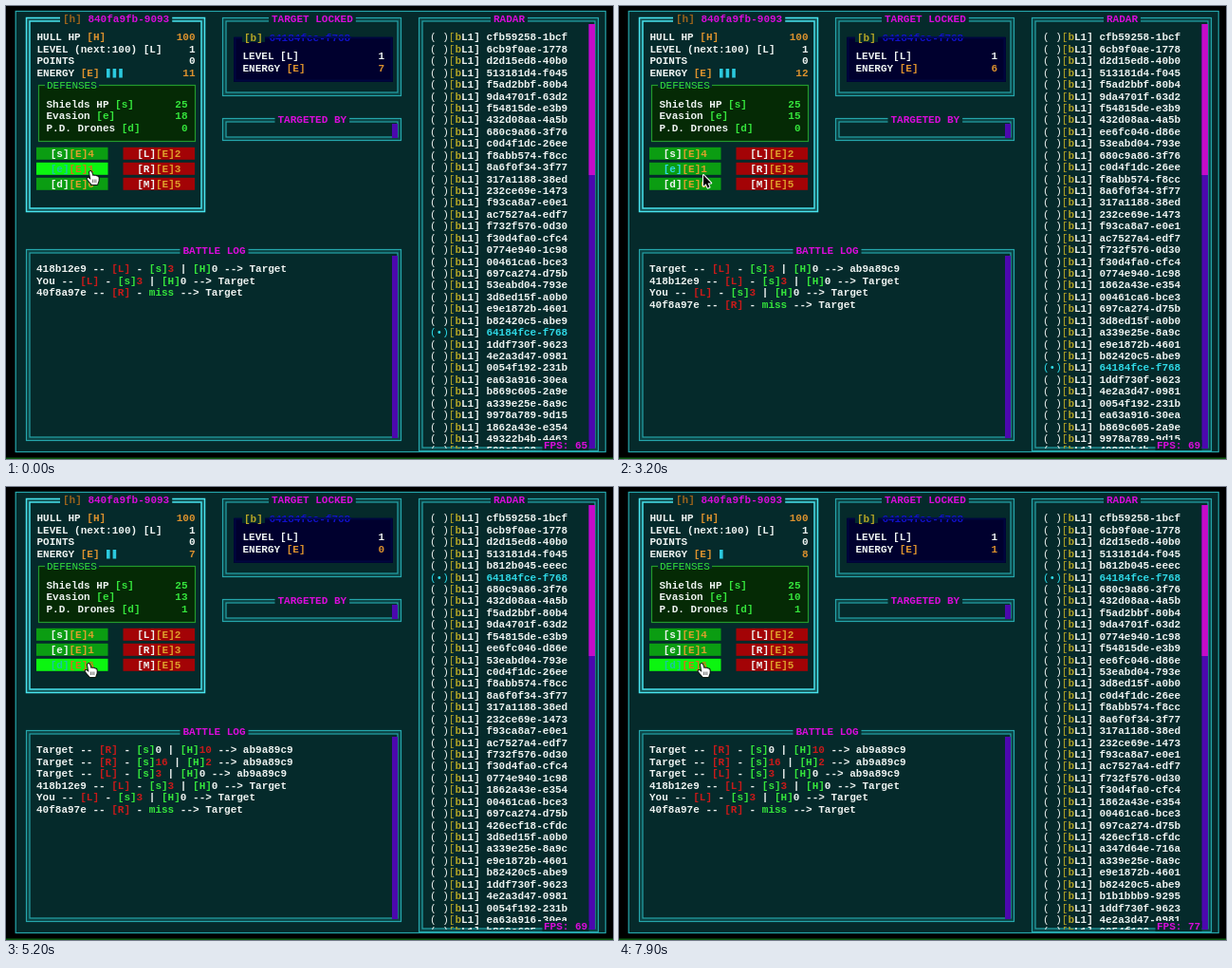
An HTML page with a canvas that plays this animation: 640 px wide and 477 px high, repeating every 8 s.

```html
<!DOCTYPE html>
<html lang="en">
<head>
<meta charset="utf-8">
<title>Battle console</title>
<style>
html, body { margin: 0; width: 100%; height: 100%; overflow: hidden; background: #000; }
canvas { display: block; width: 640px; height: 477px; }
</style>
</head>
<body>
<canvas id="stage" width="640" height="477"></canvas>
<script>
const ctx = document.getElementById('stage').getContext('2d');
const LOOP = 8000, CELL = 6.601, ROW = 12.43;
const FACE = '11px "Liberation Mono", "DejaVu Sans Mono", monospace';
const BG = '#052a2b', TEAL = '#25a6ab', CYAN = '#48e4ee', PURPLE = '#4c08ae';

// Colour codes used inside {x} tags; capitals are in regular weight.
const INK = {
  w: '#eef3f1', W: '#eef3f1', o: '#dd922e', g: '#35e53c', G: '#35e03c', r: '#c81a1a',
  c: '#2fd9e6', C: '#2fd9e6', y: '#b5a526', Y: '#b5a526', m: '#d80cda', h: '#9a631c',
  b: '#1010c8', f: '#dda02c', x: '#d3721a', t: '#18c8a0'
};

const ships = ('cfb59258-1bcf 6cb9f0ae-1778 d2d15ed8-40b0 513181d4-f045 f5ad2bbf-80b4 9da4701f-63d2 ' +
  'f54815de-e3b9 432d08aa-4a5b 680c9a86-3f76 c0d4f1dc-26ee f8abb574-f8cc 8a6f0f34-3f77 317a1188-38ed ' +
  '232ce69e-1473 f93ca8a7-e0e1 ac7527a4-edf7 f732f576-0d30 f30d4fa0-cfc4 0774e940-1c98 00461ca6-bce3 ' +
  '697ca274-d75b 53eabd04-793e 3d8ed15f-a0b0 e9e1872b-4601 b82420c5-abe9 64184fce-f768 1ddf730f-9623 ' +
  '4e2a3d47-0981 0054f192-231b ea63a916-30ea b869c605-2a9e a339e25e-8a9c 9978a789-9d15 1862a43e-e354 ' +
  '49322b4b-4463 509c2a92-2a9e').split(' ');
const locked = '64184fce-f768';

// Radar updates: time, ship, new row.
const moves = [
  [1600, 'ee6fc046-d86e', 8], [1700, '1862a43e-e354', 20], [1800, 'a339e25e-8a9c', 25],
  [2700, '53eabd04-793e', 9],
  [3800, locked, 4], [3800, '680c9a86-3f76', 5], [4100, '426ecf18-cfdc', 25],
  [4900, 'b812b045-eeec', 4], [5100, '432d08aa-4a5b', 7], [5300, '0774e940-1c98', 10], [5500, '3d8ed15f-a0b0', 14],
  [6500, 'a347d64e-716a', 28], [7100, 'b1b1bbb9-9295', 32]
];

// Battle log, newest last.
const log = [
  [0, '{w}40f8a97e -- {r}[R]{w} - {g}miss{w} --> Target'],
  [0, '{w}You -- {r}[L]{w} - {g}[s]{r}3{w} | {g}[H]{w}0 --> Target'],
  [0, '{w}418b12e9 -- {r}[L]{w} - {g}[s]{r}3{w} | {g}[H]{w}0 --> Target'],
  [1700, '{w}Target -- {r}[L]{w} - {g}[s]{r}3{w} | {g}[H]{w}0 --> ab9a89c9'],
  [3800, '{w}Target -- {r}[R]{w} - {g}[s]{r}16{w} | {g}[H]{r}2{w} --> ab9a89c9'],
  [4200, '{w}Target -- {r}[R]{w} - {g}[s]{w}0 | {g}[H]{r}10{w} --> ab9a89c9']
];

const DRONE = 4000;
const fps = [[0, 65], [900, 66], [1800, 68], [2900, 69], [4000, 67], [5100, 69], [6200, 72], [7200, 77]];
const targetEnergy = [[0, 7], [1700, 5], [2500, 6], [3800, 3], [4200, 0], [5700, 1]];
const pointer = [[0, 88, 174], [1600, 88, 174], [1900, 88, 181], [2400, 88, 181], [2700, 89, 178], [3400, 89, 178], [3700, 86, 186], [LOOP, 86, 186]];

const valueAt = (steps, t) => steps.filter(s => s[0] <= t).pop()[1];

function pointerAt(t) {
  const i = pointer.findIndex(p => p[0] > t);
  const a = pointer[i - 1], b = pointer[i];
  const u = (t - a[0]) / (b[0] - a[0]), k = u * u * (3 - 2 * u);
  return [a[1] + (b[1] - a[1]) * k, a[2] + (b[2] - a[2]) * k];
}

function box(x, y, w, h, color) {
  ctx.fillStyle = color;
  ctx.fillRect(x, y, w, h);
}

function outline(x, y, w, h, color, width = 1) {
  ctx.strokeStyle = color;
  ctx.lineWidth = width;
  ctx.strokeRect(x + .5, y + .5, w, h);
}

// Tagged text; y is the middle of the line.
function text(x, y, tagged) {
  let code = 'w';
  tagged.split(/\{(\w)\}/).forEach((part, i) => {
    if (i % 2) { code = part; return; }
    ctx.font = (/[a-z]/.test(code) ? 'bold ' : '') + FACE;
    ctx.fillStyle = INK[code];
    ctx.fillText(part, x, y + 3.4);
    x += part.length * CELL;
  });
}

function right(x, y, code, value) {
  text(x - String(value).length * CELL, y, `{${code}}${value}`);
}

function panel(x, y, w, h, color, title, tx, width) {
  ctx.globalAlpha = .2;
  outline(x + 1.7, y + 1.7, w - 3.4, h - 3.4, color, 3);
  ctx.globalAlpha = 1;
  outline(x, y, w, h, color, width);
  outline(x + 3.5, y + 3.5, w - 7, h - 7, color, width);
  const len = title.replace(/\{\w\}/g, '').length;
  box(tx - 3, y - 1, len * CELL + 6, 8, BG);
  text(tx, y + 1.5, title);
}

function button(x, y, color, label, cost, ink = 'w', costInk = 'f') {
  box(x, y - 6.5, 75.5, 13, color);
  text(x + 14.7, y, `{${ink}}[${label}]{${costInk}}[E]${cost}`);
}

function shipPanel(t, tipY) {
  panel(21, 12, 188, 204, CYAN, '{h}[h] {m}840fa9fb-9093', 60, 1.5);
  const ticks = t + 2850;
  const energy = 11 + Math.floor(ticks / 3200) - (t >= DRONE ? 6 : 0);
  const bars = Math.floor(ticks / 800) % 4;
  text(32.5, 33, '{w}HULL HP {o}[H]');
  text(32.5, 45.4, '{w}LEVEL (next:100) [L]');
  text(32.5, 57.8, '{w}POINTS');
  text(32.5, 70.3, '{w}ENERGY {o}[E]');
  right(199.5, 33, 'o', 100);
  right(199.5, 45.4, 'w', 1);
  right(199.5, 57.8, 'w', 0);
  right(199.5, 70.3, 'o', energy);
  for (let i = 0; i < bars; i++) box(106 + i * CELL, 66, 3.6, 9.5, '#2bc9de');

  box(34, 84, 166, 59, '#052a05');
  outline(34, 83, 165, 59, '#239a2b', 1.2);
  box(41, 81, 57, 5, BG);
  text(43, 83.5, '{G}DEFENSES');
  text(42.5, 103.5, '{w}Shields HP {g}[s]');
  text(42.5, 116, '{w}Evasion {g}[e]');
  text(42.5, 128.4, '{w}P.D. Drones {g}[d]');
  right(191.5, 103.5, 'g', 25);
  right(191.5, 116, 'g', 18 - Math.floor((t + 400) / 1000));
  right(191.5, 128.4, 'g', t >= DRONE ? 1 : 0);

  const overE = tipY < 177.5, overD = tipY > 180;
  const green = over => over ? '#0cf510' : '#0b9d12';
  const onDrone = t >= DRONE;
  button(32, 155.3, green(false), 's', 4);
  button(32, 171.3, green(overE), 'e', 1, onDrone ? 'w' : overE ? 't' : 'c', overE ? 'x' : 'f');
  button(32, 187.3, green(overD), 'd', 6, onDrone ? 't' : 'w', overD ? 'x' : 'f');
  button(123.5, 155.3, '#a30306', 'L', 2);
  button(123.5, 171.3, '#a30306', 'R', 3);
  button(123.5, 187.3, '#a30306', 'M', 5);
}

function targetPanels(t) {
  panel(228, 12, 188, 82, TEAL, '{m}TARGET LOCKED', 280, 1.2);
  box(240, 33, 168, 47, '#00002e');
  outline(241, 33, 165, 45, '#00063f', 2);
  box(249, 28, 24, 10, BG);
  text(251, 33.5, '{y}[b] {b}' + locked);
  box(277, 32, 87, 2, '#000a58');
  text(249.5, 53, '{w}LEVEL [L]');
  text(249.5, 66, '{w}ENERGY {o}[E]');
  right(399, 53, 'w', 1);
  right(399, 66, 'o', valueAt(targetEnergy, t));
  panel(228, 118, 188, 23, TEAL, '{m}TARGETED BY', 286.5, 1.2);
  box(407, 124, 6, 15, PURPLE);
}

function logPanel(t) {
  panel(21, 256, 395, 201, TEAL, '{m}BATTLE LOG', 186.5, 1.2);
  box(407, 263, 6, 192, PURPLE);
  log.filter(l => l[0] <= t).reverse().forEach((l, i) => text(32, 277 + i * ROW, l[1]));
}

function radarPanel(t) {
  panel(435, 12, 189, 456, TEAL, '{m}RADAR', 514, 1.2);
  box(614.5, 19, 6.5, 447, PURPLE);
  box(614.5, 19, 6.5, 159, '#c40cc8');
  const list = ships.slice();
  for (const [at, id, row] of moves) {
    if (at > t) break;
    const old = list.indexOf(id);
    if (old >= 0) list.splice(old, 1);
    list.splice(row, 0, id);
  }
  ctx.save();
  ctx.beginPath();
  ctx.rect(440, 20, 174, 446);
  ctx.clip();
  list.slice(0, 36).forEach((id, i) => {
    const mark = id === locked ? '{C}(•)' : '{W}( )';
    text(447, 33 + i * ROW, `${mark}{Y}[{y}b{w}L1] {${id === locked ? 'c' : 'w'}}${id}`);
  });
  ctx.restore();
  box(565.5, 457, 49, 11, BG);
  text(567, 462.7, '{m}FPS: ' + valueAt(fps, t));
}

function cursor(x, y, hand) {
  ctx.save();
  ctx.translate(x, y);
  ctx.lineJoin = 'round';
  const shape = new Path2D(hand
    ? 'M0 1Q1-1 2.2 1L3.6 5Q5 3.8 5.8 5Q7 4.2 7.8 5.5Q9.4 5 9.7 7L9.6 10L8.2 14H2.6L-.5 10.5L-2.4 8Q-2 6.4-.4 7.4L1.4 9Z'
    : 'M0 0V11.6L2.7 9.2L4.6 13.6L6.5 12.8L4.6 8.5H8.2Z');
  ctx.lineWidth = 2;
  ctx.strokeStyle = hand ? '#101810' : '#fff';
  ctx.stroke(shape);
  ctx.fillStyle = hand ? '#fff' : '#000';
  ctx.fill(shape);
  if (hand) {
    ctx.fillStyle = '#444';
    for (let i = 0; i < 3; i++) ctx.fillRect(3 + i * 1.8, 8.5, .7, 3.5);
  }
  ctx.restore();
}

function draw() {
  const t = performance.now() % LOOP;
  const [px, py] = pointerAt(t);
  box(0, 0, 640, 477, '#000');
  box(0, 475.5, 640, 1.5, '#0c5a12');
  box(10, 5, 622, 465, BG);
  outline(9.7, 5, 622, 464, TEAL, 1.2);
  shipPanel(t, py);
  targetPanels(t);
  logPanel(t);
  radarPanel(t);
  cursor(px, py, py < 177.5 || py > 180);
  requestAnimationFrame(draw);
}
requestAnimationFrame(draw);
</script>
</body>
</html>
```
